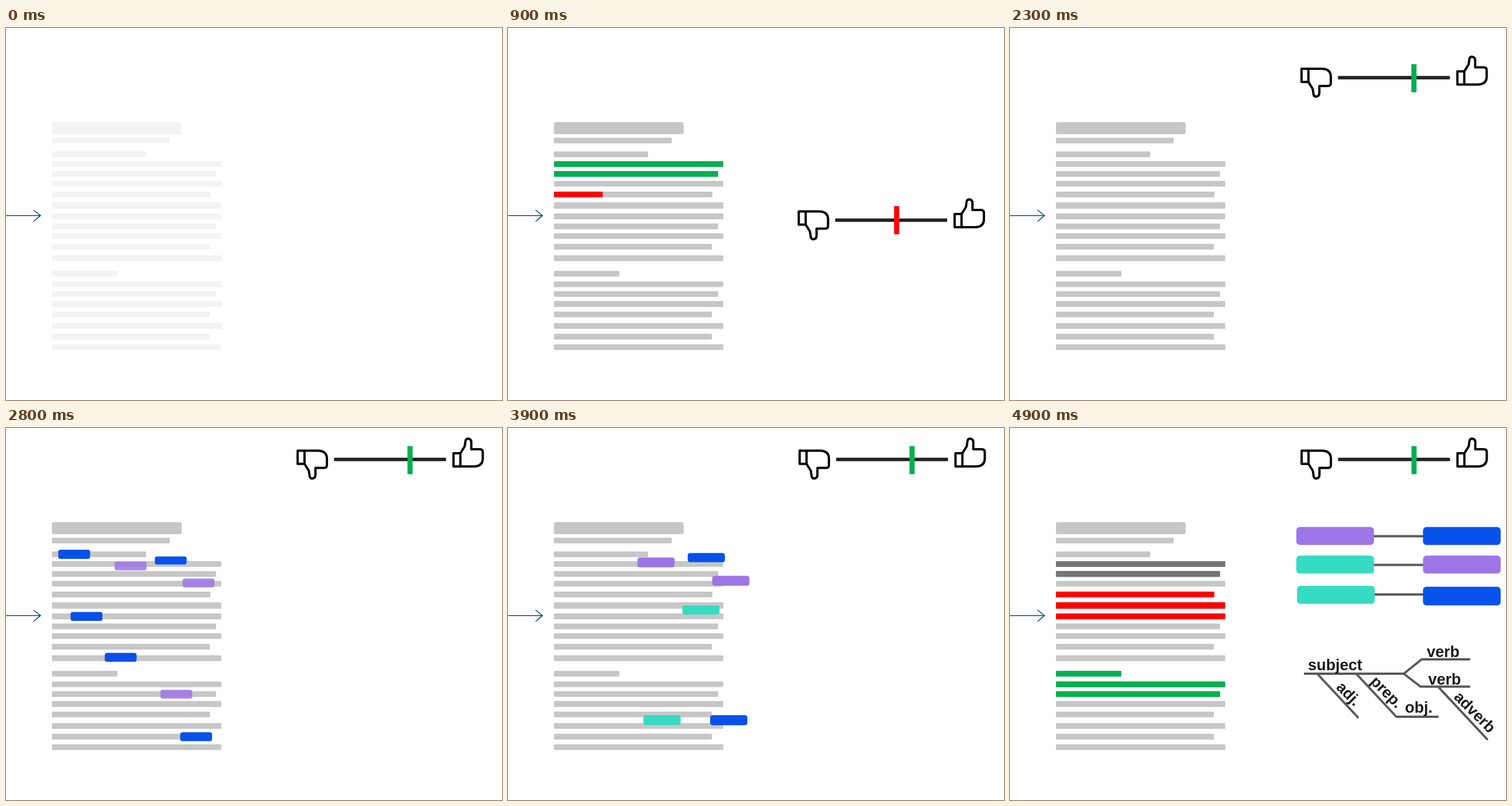
An HTML page for the animation above (5000 ms loop, 864 by 648 pixels).

```html
<!DOCTYPE html>
<html lang="en">
<head>
<meta charset="utf-8">
<title>Document analysis</title>
<style>
  html, body { margin: 0; width: 100%; height: 100%; overflow: hidden; background: #fff; }
  svg { display: block; width: 864px; height: 648px; }
  .line { fill: none; stroke: #595959; stroke-width: 4; }
  .hand { fill: none; stroke: #000; stroke-width: 4; stroke-linejoin: round; }
  text { font: bold 27px "Liberation Sans", Arial, sans-serif; fill: #1c1c1c; }
</style>
</head>
<body>
<svg viewBox="0 0 864 648">
  <defs>
    <path id="thumb" class="hand" d="M778 324H790V347H778ZM790 324L797.5 312L799 302Q800 298.5 803.5 298.5Q809 299 809 305V317H824Q829 317 829 322V333Q829 347 813 347H790"/>
    <clipPath id="wipe"><rect id="wipeBox" x="500" y="360" width="0" height="200"/></clipPath>
  </defs>
  <path d="M0 326.7H60M48 317L60 326.7L48 337" fill="none" stroke="#00506b" stroke-width="1.6"/>
  <g id="page"></g>
  <g id="marks"></g>
  <g id="gauge">
    <rect x="570" y="331.8" width="195" height="6" rx="1" fill="#222"/>
    <use href="#thumb"/>
    <use href="#thumb" transform="translate(-271.5 666.5) scale(1 -1)"/>
    <rect id="marker" y="311" width="9" height="49" rx="1"/>
  </g>
  <g id="links" class="line">
    <path d="M218.5 233V218L290 208.5V227"/>
    <path d="M301.5 318V241H342.5V262"/>
    <path d="M228.5 532V514.5H328.5V530"/>
  </g>
  <path id="joins" class="line" d="M633 188.5H721M633 238.5H721M634 290H721"/>
  <g id="tags"></g>
  <g clip-path="url(#wipe)">
    <path class="line" stroke-linejoin="round" stroke-linecap="round" d="M686 428L717 403H800M686 428L715 450.5H800M536 429L606 504M604 429L673 503H745M747 452L831 542"/>
    <path class="line" d="M512 428H686"/>
    <text x="519" y="422">subject</text>
    <text x="726" y="399">verb</text>
    <text x="728.5" y="447">verb</text>
    <text x="688" y="496">obj.</text>
    <text transform="translate(567 453) rotate(45)">adj.</text>
    <text transform="translate(626.5 443) rotate(45)">prep.</text>
    <text transform="translate(772 470) rotate(45)">adverb</text>
  </g>
</svg>
<script>
const LOOP = 5000, STEP = 100, SPEED = 1.7;   // SPEED: highlight px per ms
const GREEN = '#00b050', RED = '#ff0000';
const BLUE = '#0751eb', PURPLE = '#9e75e6', TEAL = '#37dac3';

const $ = id => document.getElementById(id);
const ramp = (t, a, b) => Math.min(1, Math.max(0, (t - a) / (b - a)));
const ease = p => (1 - Math.cos(Math.PI * p)) / 2;
const mix = (a, b, p) => a + (b - a) * p;

function set(el, attrs) {
  for (const k in attrs) el.setAttribute(k, attrs[k]);
  return el;
}
function rect(parent, x, y, width, height, rx, fill) {
  const el = document.createElementNS('http://www.w3.org/2000/svg', 'rect');
  return parent.appendChild(set(el, { x, y, width, height, rx, fill }));
}

// text rows: y, height, width
const rows = [
  [164, 21, 226], [191, 10, 205], [215, 10, 164], [232, 10, 295], [249.3, 10, 286],
  [266.3, 10, 295], [285, 10, 276], [303.5, 11.3, 295], [323, 10.3, 295], [340.5, 10, 286],
  [357.5, 10, 295], [376, 10, 275], [396, 10, 295], [423, 10, 114], [441.5, 10, 295],
  [458.5, 10, 286], [475.5, 10.4, 295], [494, 10, 275], [514, 10, 295], [532.5, 10.2, 275],
  [551, 10, 295]
];
rows.forEach(([y, h, w], i) => rect($('page'), 80, y, w, h, i ? 1.5 : 3.5, '#c7c7c7'));

// highlight runs: start time, first row, row count, colour
const marks = [];
function highlight(start, first, count, fill) {
  for (const [y, h, w] of rows.slice(first, first + count)) {
    const end = start + w / SPEED;
    marks.push({ el: rect($('marks'), 80, y, 0, h, 1.5, fill), w, start, end });
    start = end;
  }
}
highlight(425, 3, 2, GREEN);
highlight(850, 6, 3, RED);
highlight(1400, 13, 3, GREEN);
highlight(4450, 3, 2, '#757575');

// tags: colour, x, y, height, then the place in the result list if paired
const tags = [
  [BLUE, 91, 212, 16], [BLUE, 112.5, 320.5, 15.5], [BLUE, 172, 391.7, 15.5],
  [PURPLE, 269, 456, 15.5], [TEAL, 122.3, 474, 14.5],
  [PURPLE, 189.3, 232.4, 15.5, 498.7, 172.5, 31.2], [BLUE, 259.2, 223.7, 14, 719.4, 172.5, 31.2],
  [TEAL, 277.8, 320.5, 14, 498.7, 222.3, 31.2], [PURPLE, 307.6, 262.2, 15.5, 719.4, 222.3, 31.2],
  [TEAL, 201, 530, 15.5, 500, 275, 31.2], [BLUE, 303.4, 530, 15.5, 719.4, 276.4, 32.6]
].map(([fill, x, y, h, ...to]) => ({
  el: rect($('tags'), x, y, 55.5, h, 4, fill), x, y, h, to,
  start: 2430 + 200 * [BLUE, PURPLE, TEAL].indexOf(fill)
}));
$('tags').after($('links'));

function markerX(t) {
  if (t < 850) return mix(667.5, 686, ramp(t, 425, 800));
  if (t < 1400) return mix(681.5, 632, ramp(t, 850, 1400));
  return mix(631.5, 702.3, ramp(t, 1400, 1800));
}

function draw(t) {
  $('page').style.opacity = ramp(t, -100, 400);

  $('marks').style.opacity = t < 4400 ? 1 - ramp(t, 1800, 2050) : 1;
  for (const m of marks) m.el.setAttribute('width', m.w * ramp(t, m.start, m.end));

  const up = ease(ramp(t, 1870, 2420));
  $('gauge').style.opacity = ramp(t, 200, 500);
  set($('gauge'), { transform: `translate(${1.5 * up} ${-280 * up})` });
  set($('marker'), {
    x: markerX(t) - 4.5,
    y: t >= 850 && t < 1400 ? 310.3 : 311.5,
    fill: t >= 850 && t < 1400 ? RED : GREEN
  });

  const fly = ease(ramp(t, 3820, 4180));
  for (const g of tags) {
    const shown = ramp(t, g.start, g.start + 200);
    if (!g.to.length) {
      g.el.style.opacity = shown * (1 - ramp(t, 3600, 3700));
      continue;
    }
    const [x, y, h] = g.to;
    g.el.style.opacity = shown;
    set(g.el, {
      x: mix(g.x, x, fly), y: mix(g.y, y, fly),
      width: mix(55.5, 135.3, fly), height: mix(g.h, h, fly), rx: mix(4, 6, fly)
    });
  }
  $('links').style.opacity = ramp(t, 3050, 3400) * (1 - ramp(t, 3800, 3900));
  $('joins').style.opacity = ramp(t, 4050, 4200);
  $('wipeBox').setAttribute('width', 345 * ramp(t, 4420, 4850));
}

const begin = performance.now();
function tick(now) {
  const t = Math.max(0, now - begin) % LOOP;
  draw(Math.floor(t / STEP) * STEP);
  requestAnimationFrame(tick);
}
draw(0);
requestAnimationFrame(tick);
</script>
</body>
</html>
```
